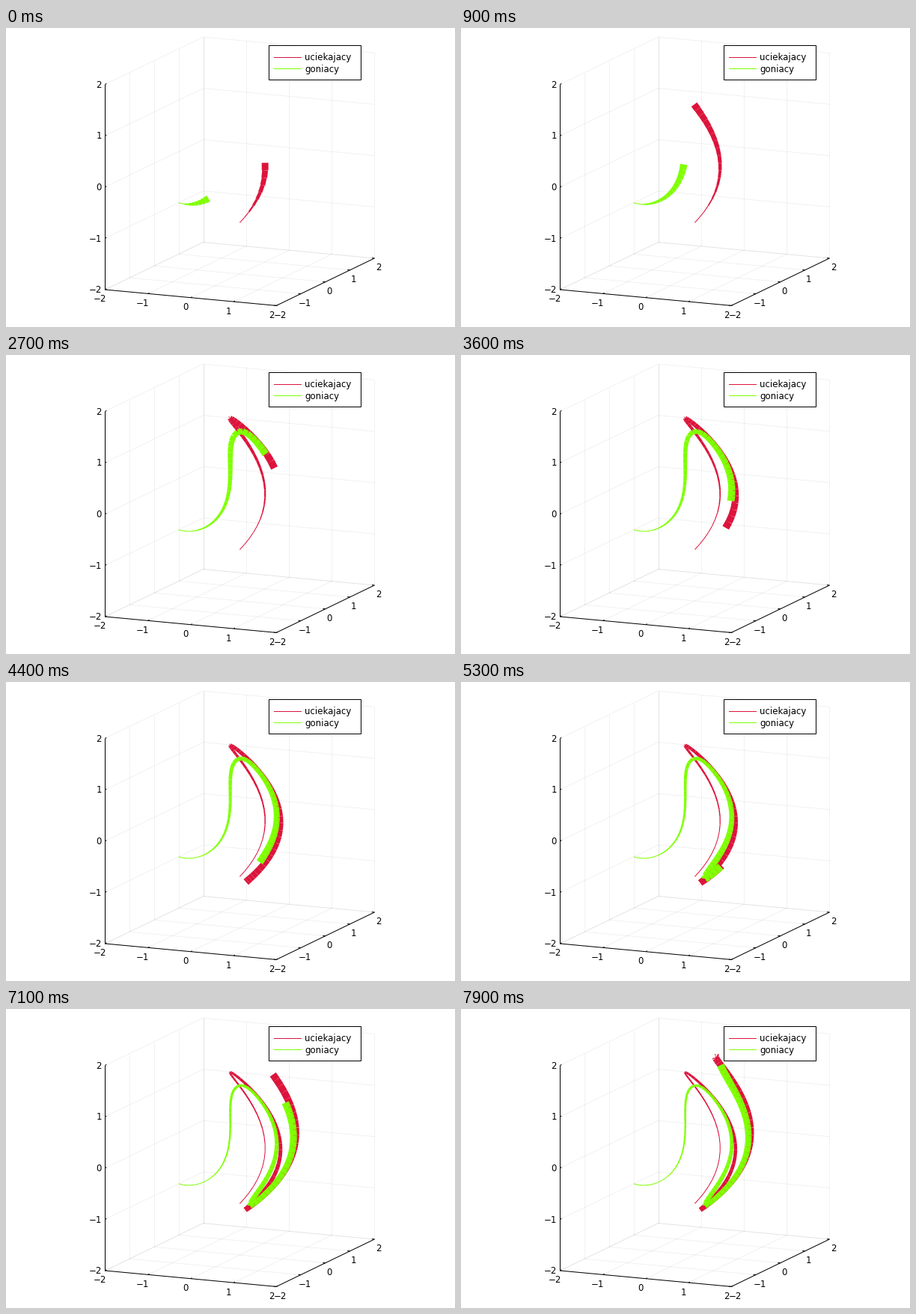
Write a matplotlib script that moves like this. It is 600x400 px and loops after 8000 ms.

```python
import numpy as np
import matplotlib.pyplot as plt
from matplotlib.animation import FuncAnimation
from matplotlib.collections import LineCollection
from matplotlib.patches import Rectangle

W, H, DPI = 600, 400, 100
PX = 72 / DPI                 # one pixel in points
FRAMES, INTERVAL = 80, 100
DT, SPEED = 0.1, 1.1
SUB = 20                      # pursuit steps per drawn point
FIRST = 10                    # points on the first frame
FONT = 11.7 * PX
CRIMSON, CHARTREUSE = "#dc143c", "#7fff00"
TICKS = range(-2, 3)

plt.rcParams["font.family"] = "DejaVu Sans"


def project(x, y, z):
    """Orthographic view, in stage pixels."""
    return (312.4 + 57.2 * x + 32.8 * y,
            191.7 + 5.35 * x - 15.85 * y - 68.65 * z)


def evader_path(t):
    return np.column_stack([np.sin(t) * np.cos(t), 0.2 * t, np.sin(t) - np.cos(t)])


def pursuer_path(prey, start, step):
    """Head straight for the prey at constant speed, never past it."""
    path = [np.array(start, float)]
    for goal in prey[1:]:
        gap = goal - path[-1]
        dist = np.linalg.norm(gap)
        path.append(path[-1] + gap * min(1, step / dist))
    return np.array(path)


def segments(path):
    pts = np.column_stack(project(*path.T))
    return np.stack([pts[:-1], pts[1:]], axis=1)


fig = plt.figure(figsize=(W / DPI, H / DPI), dpi=DPI, facecolor="white")
ax = fig.add_axes([0, 0, 1, 1])
ax.set_xlim(0, W)
ax.set_ylim(H, 0)
ax.axis("off")


def line3(a, b, **style):
    (u0, v0), (u1, v1) = project(*a), project(*b)
    ax.plot([u0, u1], [v0, v1], lw=PX, solid_capstyle="butt", **style)


def label(u, v, text, ha="center"):
    ax.text(u, v + 4.3, text, fontsize=FONT, ha=ha, va="baseline", zorder=6)


def draw_box():
    grid = dict(color="black", alpha=0.055, zorder=1)
    ink = dict(color="black", zorder=2)
    for k in TICKS:
        line3((k, -2, -2), (k, 2, -2), **grid)
        line3((k, 2, -2), (k, 2, 2), **grid)
        line3((-2, k, -2), (2, k, -2), **grid)
        line3((-2, k, -2), (-2, k, 2), **grid)
        line3((-2, -2, k), (-2, 2, k), **grid)
        line3((-2, 2, k), (2, 2, k), **grid)

        line3((k, -2, -2), (k, -1.94, -2), **ink)
        line3((2, k, -2), (1.94, k, -2), **ink)
        line3((-2, -2, k), (-2, -1.94, k), **ink)

        name = str(k).replace("-", "\u2212")
        u, v = project(k, -2, -2)
        label(u - 6.8, v + 12.2, name)
        u, v = project(2, k, -2)
        label(u + 5.3, v + 12.2, name)
        u, v = project(-2, -2, k)
        label(u - 4.6, v, name, ha="right")

    line3((-2, -2, -2), (2, -2, -2), **ink)
    line3((2, -2, -2), (2, 2, -2), **ink)
    line3((-2, -2, -2), (-2, -2, 2), **ink)


def draw_legend():
    ax.add_patch(Rectangle((351, 23), 123, 46, fc="white", ec="black",
                           lw=PX, zorder=5))
    for v, color, name in ((39, CRIMSON, "uciekajacy"), (54, CHARTREUSE, "goniacy")):
        ax.plot([358, 394], [v, v], color=color, lw=PX, zorder=6)
        label(399.4, v + 0.2, name, ha="left")


draw_box()
draw_legend()

count = FIRST + FRAMES - 1
fine = evader_path(np.arange(count * SUB) * DT / SUB)
evader = fine[::SUB]
pursuer = pursuer_path(fine, (-2, 1, -1), SPEED * DT / SUB)[::SUB]
trails = []
for path, color, z in ((evader, CRIMSON, 3), (pursuer, CHARTREUSE, 4)):
    trail = LineCollection([], colors=color, capstyle="butt", zorder=z)
    ax.add_collection(trail, autolim=False)
    trails.append((trail, segments(path)))


def update(frame):
    n = FIRST + frame
    widths = np.maximum(np.linspace(0, 10, n)[:-1], 1) * PX
    for trail, segs in trails:
        trail.set_segments(segs[:n - 1])
        trail.set_linewidths(widths)
    return [trail for trail, _ in trails]


anim = FuncAnimation(fig, update, frames=FRAMES, interval=INTERVAL,
                     init_func=lambda: update(0), repeat=True, repeat_delay=0)
plt.show()
```
